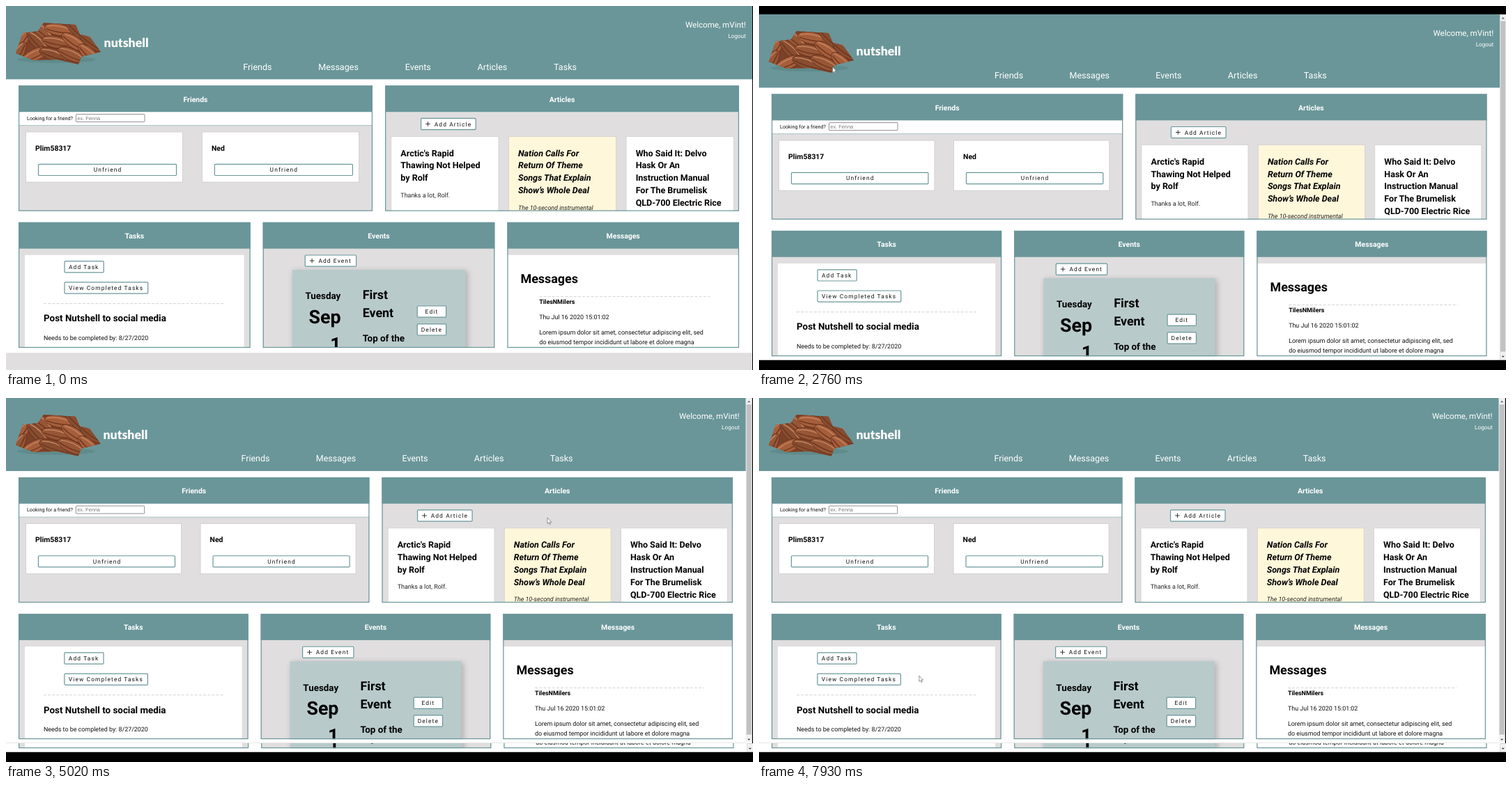
An HTML page for the animation above (8 s loop, 1072 px wide and 523 px high).

```html
<!DOCTYPE html>
<html lang="en">
<head>
<meta charset="utf-8">
<title>Dashboard</title>
<style>
html, body { margin: 0; width: 100%; height: 100%; overflow: hidden; background: #000; }
svg { display: block; }
#stage { width: 1072px; height: 523px; font-family: Roboto, sans-serif; text-rendering: geometricPrecision; }
</style>
</head>
<body>
<svg id="stage" viewBox="0 0 1072 523" xmlns="http://www.w3.org/2000/svg">
  <defs>
    <filter id="soft" x="-20%" y="-20%" width="140%" height="140%"><feGaussianBlur stdDeviation="4"/></filter>
    <clipPath id="upper"><rect width="1072" height="496"/></clipPath>
    <clipPath id="pile">
      <path d="M14 68L24 39L46 36L54 24L100 27L106 41L120 44L136 66L108 73L104 84L74 77L40 78Z"/>
    </clipPath>
  </defs>
  <g id="full"></g>
  <g id="windowed"></g>
  <g id="raised" clip-path="url(#upper)"></g>
  <path id="cursor" d="M0 0V8.4L1.9 6.7L3.1 9.6L4.5 9L3.2 6.2H5.8Z" fill="#fff" stroke="#555" stroke-width=".6"/>
</svg>
<script>
const TEAL = '#6a9699', GREY = '#e0dedf', BODY = 8.94;
const PANEL_H = 180.3, HEAD_H = 37.8, PAD = 13.6;
const $ = id => document.getElementById(id);

const rect = (x, y, w, h, fill, extra = '') =>
  `<rect x="${x}" y="${y}" width="${w}" height="${h}" fill="${fill}" ${extra}/>`;
const text = (x, y, str, size, extra = '') =>
  `<text x="${x}" y="${y}" font-size="${size}" ${extra}>${str}</text>`;
const bold = (x, y, str, size, extra = '') => text(x, y, str, size, 'font-weight="700" ' + extra);
const lines = (x, y, step, list, draw) => list.map((s, i) => draw(x, y + i * step, s)).join('');
const dashes = (x1, x2, y) =>
  `<path d="M${x1} ${y}H${x2}" stroke="#d4d4d4" stroke-dasharray="4 2.2"/>`;
const clip = (x, y, w, h, inner) =>
  `<svg x="${x}" y="${y}" width="${w}" height="${h}" viewBox="${x} ${y} ${w} ${h}">${inner}</svg>`;

function button(x, y, w, label, tx = x + 6, anchor = 'start') {
  return rect(x, y, w, 16.2, '#fff', `rx="1.2" stroke="${TEAL}" stroke-width="1.2"`) +
    text(tx, y + 11.1, label, 8.4, `letter-spacing="1.12" fill="#111" text-anchor="${anchor}"`);
}
const addButton = (x, y, w, label) => button(x, y, w, label, x + 19.2) +
  `<path d="M${x + 6.6} ${y + 8}h6.6m-3.3-3.3v6.6" stroke="#222" stroke-width=".9"/>`;

function panel(x, y, w, title, inner) {
  return rect(x, y, w, PANEL_H, GREY) + clip(x, y, w, PANEL_H, inner) +
    rect(x, y, w, HEAD_H, TEAL) +
    rect(x + .6, y + .6, w - 1.2, PANEL_H - 1.2, 'none', `stroke="${TEAL}" stroke-width="1.2"`) +
    bold(x + w / 2, y + 23.2, title, 10.45, 'fill="#fff" text-anchor="middle"');
}

// A heap of striped brown nuts, cut to the outline of the pile.
function nuts() {
  let out = rect(10, 20, 130, 70, '#7d4128');
  for (let i = 0; i < 15; i++) {
    const row = Math.floor(i / 5), x = 24 + (i % 5) * 26 - row * 4, y = 34 + row * 18;
    const turn = 28 + 18 * Math.sin(i * 2.4) - (x < 45 ? 70 : 0);
    out += `<g transform="translate(${x} ${y}) rotate(${turn})">
      <ellipse rx="21" ry="8.5" fill="hsl(20 48% ${36 + i % 3 * 4}%)" stroke="#64301c" stroke-width=".8"/>
      <path d="M-18 -2Q0 -8 18 -2" fill="none" stroke="#c58460" stroke-width="1.5"/>
      <path d="M-18 2Q0 5 18 2" fill="none" stroke="#6b3520" stroke-width="1.4"/></g>`;
  }
  return '<ellipse cx="72" cy="77" rx="56" ry="5" fill="#55817f" opacity=".5"/>' +
    `<g clip-path="url(#pile)">${out}</g>`;
}

function header(W, k) {
  const white = 'fill="#fff"', right = white + ' text-anchor="end"';
  const nav = ['Friends', 'Messages', 'Events', 'Articles', 'Tasks']
    .map((s, i) => `<tspan dx="${i ? 66.8 * k : 0}">${s}</tspan>`).join('');
  return rect(0, 0, W, 105.3, TEAL) + nuts() +
    text(140.6 * k, 58.8, 'nutshell', 17.8, white + ' font-weight="900" font-family="Lato, sans-serif"') +
    text(340.3 * k, 91.6, nav, 12.55, white) +
    text(W - 9.3, 30.5, 'Welcome, mVint!', 11.6, right) +
    text(W - 9.3, 45.5, 'Logout', 8.2, right);
}

function friends(x, y, w) {
  const card = (cx, name) => {
    const cw = w * .443;
    return rect(cx, 181, cw, 72, '#fff', 'stroke="#cdcdcd" stroke-width=".8"') +
      bold(cx + PAD, 207.6, name, 10.45) +
      button(cx + 18, 227.3, cw - 27, 'Unfriend', cx + 5 + cw / 2, 'middle');
  };
  return panel(x, y, w, 'Friends',
    rect(x, y + HEAD_H, w, 19, '#fff') + rect(x, y + 56.7, w, .9, '#a9c2c3') +
    text(30, 163.6, 'Looking for a friend?', 7.23, 'fill="#111"') +
    rect(100.5, 155.5, 98.5, 11, '#fff', 'stroke="#858585" stroke-width=".9" rx=".8"') +
    text(102.3, 163.6, 'ex. Fenna', 7.4, 'fill="#7b7b7b" font-family="Liberation Sans, sans-serif"') +
    card(x + 10.5, 'Plim58317') + card(x + w * .5185, 'Ned'));
}

function articles(x, y, w) {
  const card = (i, fill, heads, desc, style) => {
    const cx = x + w * (.0172 + i * .332), tx = cx + PAD;
    return rect(cx, 187.4, w * .3035, 130, fill, 'stroke="#d2d0d0" stroke-width=".8"') +
      lines(tx, 215.5, 17.95, heads, (a, b, s) => bold(a, b, s, 12.5, style)) +
      text(tx, 220.8 + 17.95 * heads.length, desc, BODY, style + ' fill="#222"');
  };
  return panel(x, y, w, 'Articles',
    addButton(x + w * .1015, 161.4, 78.6, 'Add Article') +
    card(0, '#fff', ["Arctic's Rapid", 'Thawing Not Helped', 'by Rolf'], 'Thanks a lot, Rolf.', '') +
    card(1, '#fff7da', ['Nation Calls For', 'Return Of Theme', 'Songs That Explain', 'Show’s Whole Deal'],
      'The 10-second instrumental', 'font-style="italic"') +
    card(2, '#fff', ['Who Said It: Delvo', 'Hask Or An', 'Instruction Manual', 'For The Brumelisk',
      'QLD-700 Electric Rice'], '', ''));
}

function tasks(x, y, w) {
  return panel(x, y, w, 'Tasks',
    rect(x + 9, 357.8, w - 18, 140, '#fff') +
    button(84, 366.7, 56.2, 'Add Task') +
    button(84, 396.9, 119.7, 'View Completed Tasks') +
    dashes(54, x + w - 36, 427.6) +
    bold(54, 453.4, 'Post Nutshell to social media', 13.4) +
    text(54, 479.6, 'Needs to be completed by: 8/27/2020', BODY, 'fill="#111"'));
}

function events(x, y, w) {
  const cw = w - 84, bx = x + w * .666, tx = x + 143, end = 'text-anchor="end"';
  return panel(x, y, w, 'Events',
    rect(x + 44, 381, cw + 1, 140, '#000', 'opacity=".22" filter="url(#soft)"') +
    rect(x + 42.2, 379, cw, 140, '#b9cacb') +
    addButton(x + w * .182, 358, 73.4, 'Add Event') +
    bold(x + 111.7, 421.4, 'Tuesday', 13.4, end) +
    lines(x + 112, 456, 38.6, ['Sep', '1'], (a, b, s) => bold(a, b, s, 26.8, end)) +
    lines(tx, 421, 26.3, ['First', 'Event'], (a, b, s) => bold(a, b, s, 17.87)) +
    bold(tx, 481.8, 'Top of the', 13.4) +
    button(bx, 431, 41.4, 'Edit', bx + 11.4) +
    button(bx, 456.8, 41.4, 'Delete', bx + 5.5));
}

function messages(x, y, w) {
  const tx = x + 45.8, dark = 'fill="#111"';
  return panel(x, y, w, 'Messages',
    rect(x, 357.8, w, 140, '#fff') +
    bold(x + 19.2, 398, 'Messages', 17.87) +
    dashes(tx, x + w - 41.5, 417.4) +
    bold(tx, 427.7, 'TilesNMilers', BODY) +
    text(tx, 449.8, 'Thu Jul 16 2020 15:01:02', BODY, dark) +
    lines(tx, 472, 13.7, [
      'Lorem ipsum dolor sit amet, consectetur adipiscing elit, sed',
      'do eiusmod tempor incididunt ut labore et dolore magna'
    ], (a, b, s) => text(a, b, s, BODY, dark)));
}

function page(W) {
  const top = (W - 55) / 2, low = (W - 73) / 3, gap = 18, y1 = 114.4, y2 = 310.8;
  return rect(0, 0, W, 523, '#fff') + header(W, W / 1071) +
    friends(gap, y1, top) + articles(2 * gap + top, y1, top) +
    tasks(gap, y2, low) + events(2 * gap + low, y2, low) + messages(3 * gap + 2 * low, y2, low) +
    rect(0, 498.4, W, 25, GREY);
}

function scrollbar(x) {
  return rect(x, 0, 9, 497, '#f1f1f1') + rect(x + 1, 9.5, 7, 475, '#c1c1c1') +
    `<path d="M${x + 2.4} 6.4l2.1-2.4l2.1 2.4z" fill="#666"/>
     <path d="M${x + 2.4} 490.6l2.1 2.4l2.1-2.4z" fill="#444"/>`;
}

const narrow = page(1063.5) + scrollbar(1063.2);
$('full').innerHTML = page(1071) + rect(1071, 0, 1, 523, '#000');
$('windowed').innerHTML = rect(0, 0, 1072, 523, '#000') +
  `<g transform="translate(0 12.1)">${clip(0, 0, 1072, 496.7, narrow)}</g>`;
$('raised').innerHTML = rect(0, 0, 1072, 496, '#fff') +
  `<g transform="translate(0 -.2) scale(.9985)">${clip(0, 0, 1073, 495, narrow)}</g>` +
  rect(0, 495.2, 1062, .8, '#e2e2e2') + rect(1070.8, 0, 1.2, 496, '#000');

// Pointer strokes as time, x, y; it is hidden between strokes.
const STROKES = [
  [[600, 16, 223], [690, 16, 223]],
  [[880, 82, 168], [1200, 77, 126], [1470, 92, 104], [1840, 121, 78], [2530, 110, 70],
    [2760, 105.5, 87.5], [2840, 105.5, 79], [3490, 101, 152], [3680, 110, 154],
    [3980, 264.3, 160], [4460, 656, 157], [4730, 771, 152], [5120, 779, 179]],
  [[5420, 811, 331], [5830, 823, 396], [6200, 821.8, 397.3], [6970, 546, 414]],
  [[7070, 494, 413], [7250, 470, 412], [7930, 229.8, 399], [8000, 229.8, 399]]
];

function pointer(t) {
  const keys = STROKES.find(s => t >= s[0][0] && t < s[s.length - 1][0]);
  if (!keys) return null;
  const i = keys.findIndex(k => k[0] > t), [t0, x0, y0] = keys[i - 1], [t1, x1, y1] = keys[i];
  const p = (t - t0) / (t1 - t0);
  return [x0 + (x1 - x0) * p, y0 + (y1 - y0) * p];
}

const show = (id, on) => $(id).setAttribute('visibility', on ? 'visible' : 'hidden');

function draw(t) {
  show('full', t < 120);
  show('windowed', t >= 120);
  show('raised', t >= 2840);
  const at = pointer(t);
  show('cursor', at);
  if (at) $('cursor').setAttribute('transform', `translate(${at})`);
}

const start = performance.now();
function tick() {
  draw((performance.now() - start) % 8000);
  requestAnimationFrame(tick);
}
tick();
</script>
</body>
</html>
```
